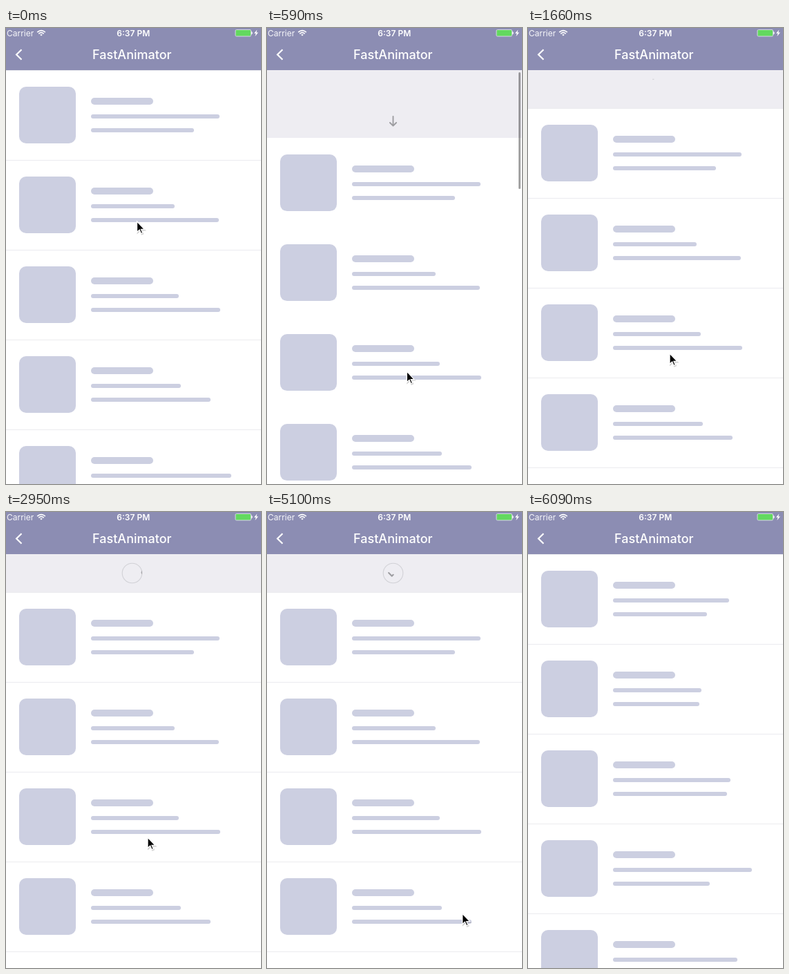
An HTML page for the animation above (6230 ms loop, 369 px wide and 660 px high).

```html
<!DOCTYPE html>
<html lang="en">
<head>
<meta charset="utf-8">
<title>Pull to refresh</title>
<style>
  html, body { margin: 0; width: 100%; height: 100%; overflow: hidden; background: #fff; }
  svg { display: block; width: 369px; height: 660px; }
  text { font-family: Inter, Roboto, "Liberation Sans", sans-serif; fill: #fff; }
  .ink { fill: none; stroke: #9d9da1; stroke-width: 1.9; stroke-linecap: round; stroke-linejoin: round; }
  .bar { fill: #cccfe1; }
  .line { fill: #ebebef; }
</style>
</head>
<body>
<svg viewBox="0 0 369 660">
  <rect width="369" height="660" fill="#eeedf2"/>
  <g id="list">
    <rect width="369" height="760" fill="#fff"/>
    <g id="oldRows"></g>
    <g id="newRows"></g>
    <g id="lines"></g>
    <g transform="translate(182.5 0)">
      <path id="arrow" class="ink"/>
      <g transform="translate(0 -27.5)">
        <path id="ring" fill="none" stroke="#d1d1d6" stroke-width="1.1"/>
        <path id="spot" fill="#8f8f93"/>
        <path id="check" class="ink" pathLength="1" stroke-dasharray="1 2" style="stroke-width:2.1" d="M-6.4 -.4L-1.8 4.2L6.6 -4.2"/>
      </g>
    </g>
  </g>
  <rect id="scroll" x="364" y="64" width="3" rx="1.5" fill="#000" fill-opacity=".36"/>
  <rect width="369" height="61" fill="#8c8db3"/>
  <text x="1" y="11.5" font-size="12" opacity=".92">Carrier</text>
  <g fill="none" stroke="#fff" stroke-width="1.7">
    <path d="M45.2 6.2Q51 .9 56.8 6.2M47.3 8.3Q51 5 54.7 8.3"/>
    <path d="M51 11.6L49.2 9.7Q51 8.2 52.8 9.7Z" fill="#fff" stroke="none"/>
  </g>
  <text x="184.3" y="11.5" font-size="12" font-weight="600" text-anchor="middle">6:37 PM</text>
  <rect x="332" y="2.5" width="22.5" height="9.5" rx="1.5" fill="#63d95f" stroke="#d5d6e5"/>
  <path d="M355.6 5.3Q357.2 7.2 355.6 9.2Z" fill="#fff" stroke="#fff" stroke-width=".7"/>
  <path d="M363.4 2.5L359 7.8H361.6L360.5 12L365 6.5H362.3Z" fill="#fff"/>
  <path d="M22.5 31.2L15.1 38.5L22.5 45.8" fill="none" stroke="#fff" stroke-width="2.2"/>
  <text x="182.3" y="45.4" font-size="18" font-weight="500" text-anchor="middle">FastAnimator</text>
  <g id="cursor">
    <path d="M0 0V15.5L3.6 12.2L6 17.6L8.3 16.6L6 11.4H10.8Z" transform="translate(.8 1.2)" fill="#000" opacity=".18" stroke="#000" stroke-width="1.6"/>
    <path d="M0 0V15.5L3.6 12.2L6 17.6L8.3 16.6L6 11.4H10.8Z" stroke="#fff" stroke-width="1.3"/>
  </g>
</svg>
<script>
const LOOP = 6230, REST = 55, RADIUS = 14.3;
const RELEASE = 760, DOCKED = 1160, RING_END = 2785, LOADED = 4880, CLOSE = 5830, CLOSED = 6090;
const $ = id => document.getElementById(id);
const set = (id, name, value) => $(id).setAttribute(name, value);
const show = (id, on) => set(id, 'visibility', on ? 'visible' : 'hidden');
const clamp = x => Math.max(0, Math.min(1, x));
const part = (t, a, b) => clamp((t - a) / (b - a));
const ease = x => (1 - Math.cos(Math.PI * x)) / 2;
const mix = (a, b, k) => a + (b - a) * k;

const rect = (cls, x, y, w, h, r = 0) =>
  `<rect class="${cls}" x="${x}" y="${y}" width="${w}" height="${h}" rx="${r}"/>`;

// Each row: right ends of its two text lines.
const fillRows = (id, ends) => $(id).innerHTML = ends.map(([a, b], i) => {
  const y = i * 130;
  return rect('bar', 19, y + 24, 82, 82, 10) + rect('bar', 123, y + 40, 90, 10, 5) +
    rect('bar', 123, y + 64, a - 123, 6, 3) + rect('bar', 123, y + 84, b - 123, 6, 3);
}).join('');

fillRows('oldRows', [[309, 272], [244, 308], [250, 310], [253, 296], [326, 280]]);
fillRows('newRows', [[291, 259], [251, 248], [293, 288], [324, 263], [303, 270]]);
$('lines').innerHTML = [0, 1, 2, 3, 4].map(i => rect('line', 0, i * 130, 369, 1)).join('');

// Pointer stops: time, x, y
const stops = [
  [60, 189.5, 280], [640, 202.5, 501], [700, 202.5, 501], [760, 202.5, 519.5],
  [930, 202.5, 519.5], [1300, 205, 471], [4060, 205, 471], [4430, 209, 470],
  [4700, 209, 470], [5320, 311, 624], [5510, 317, 662]
];

function pointer(t) {
  if (t <= stops[0][0]) return stops[0].slice(1);
  const i = stops.findIndex(s => s[0] >= t);
  if (i < 0) return [317, 662];
  const [a, b] = [stops[i - 1], stops[i]];
  const k = ease(part(t, a[0], b[0]));
  return [mix(a[1], b[1], k), mix(a[2], b[2], k)];
}

// Rubber-band resistance of the pulled list.
function stretch(y) {
  const pull = (y - 280) * 0.54;
  return 599 * pull / (599 + pull);
}

function offset(t) {
  if (t < RELEASE) return stretch(pointer(t)[1]);
  if (t < CLOSE) return mix(stretch(519.5), REST, ease(part(t, RELEASE, DOCKED)));
  return mix(REST, 0, ease(part(t, CLOSE, CLOSED)));
}

function polar(deg, r) {
  const a = deg * Math.PI / 180;
  return `${(r * Math.cos(a)).toFixed(2)} ${(r * Math.sin(a)).toFixed(2)}`;
}

// Anticlockwise from the top.
function ringPath(p) {
  if (p <= 0) return '';
  const arc = (r, deg, large) => `A${r} ${r} 0 ${large} 0 ${polar(deg, r)}`;
  const start = `M${polar(-90, RADIUS)}`;
  if (p >= 1) return start + arc(RADIUS, 90, 0) + arc(RADIUS, -90, 0) + 'Z';
  return start + arc(RADIUS, -90 - 360 * p, p > 0.5 ? 1 : 0);
}

function spotPath(deg) {
  const [a, b] = [polar(deg - 12, RADIUS), polar(deg + 12, RADIUS)];
  return `M${a}A15 15 0 0 1 ${b}Q${polar(deg, RADIUS - 1.9)} ${a}Z`;
}

function arrowPath(k) {
  const top = mix(-31, -42, clamp(2 * k)), tip = mix(-17.5, -42, k), w = 4.6 * (1 - k);
  return `M0 ${top}V${tip}M${-w} ${tip - w}L0 ${tip}L${w} ${tip - w}`;
}

function draw(t) {
  const o = offset(t);
  const moving = (t > 60 && t < DOCKED) || (t >= CLOSE && t < CLOSED);
  set('list', 'transform', `translate(0 ${61 + o})`);
  show('oldRows', t < CLOSE);
  show('newRows', t >= CLOSE);
  show('lines', !moving);

  set('arrow', 'd', arrowPath(ease(part(t, 950, 1300))));
  show('arrow', t < 1300);
  set('ring', 'd', ringPath(part(t, 1400, RING_END) ** 2.2));
  set('spot', 'd', spotPath(-90 + (t - RING_END) * 360 / 697));
  show('spot', t >= RING_END && t < LOADED);
  set('check', 'stroke-dashoffset', 1 - ease(part(t, LOADED, 5320)));
  show('check', t > LOADED);

  set('scroll', 'height', (t < RELEASE ? 267 : 274) - o);
  set('scroll', 'opacity', t < DOCKED ? part(t, 60, 110) : 1 - part(t, DOCKED, 1300));
  set('cursor', 'transform', `translate(${pointer(t).join(' ')})`);
  show('cursor', t < 5510);
}

const begin = performance.now();
function tick() {
  draw((performance.now() - begin) % LOOP);
  requestAnimationFrame(tick);
}
tick();
</script>
</body>
</html>
```
